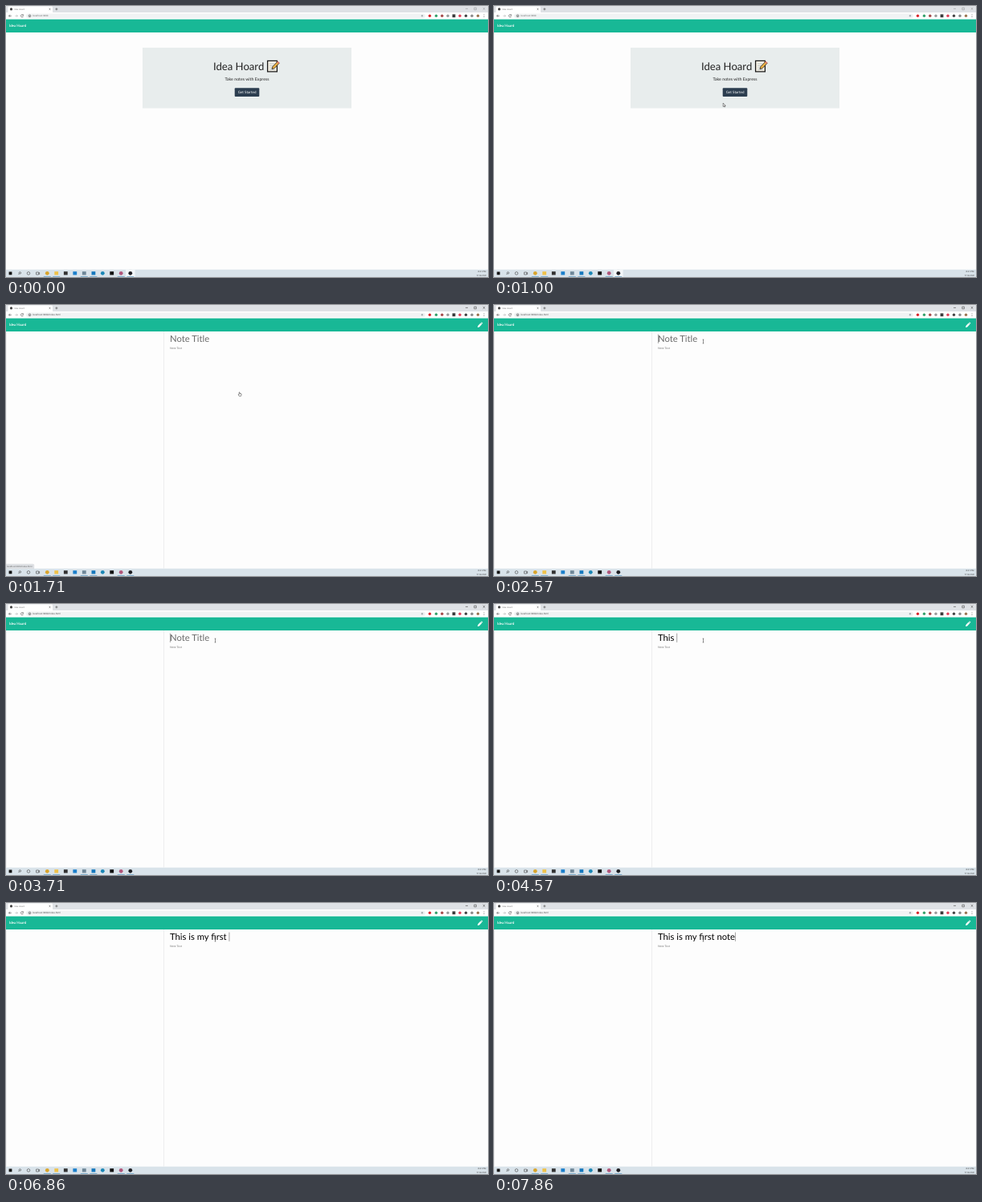
Write an HTML page that moves like this. It is 600x338 px and loops after 8000 ms.

```html
<!DOCTYPE html>
<html lang="en">
<head>
<meta charset="utf-8">
<title>Idea Hoard</title>
<style>
  html, body { margin: 0; width: 100%; height: 100%; overflow: hidden; background: #fdfdfd; }
  svg { display: block; width: 100%; height: 100%; }
  text { font-family: Lato, sans-serif; white-space: pre; text-rendering: geometricPrecision; }
  .ui { font-family: "Open Sans", sans-serif; }
  .line { fill: none; stroke: #444; stroke-width: .6; }
</style>
</head>
<body>
<svg viewBox="0 0 600 338">
  <rect width="600" height="338" fill="#fdfdfd"/>

  <g id="home">
    <rect x="170" y="52" width="260" height="75.5" fill="#e8eded"/>
    <text x="258" y="79.6" font-size="13.125" fill="#222">Idea Hoard</text>
    <g id="memo">
      <path d="M325.6 68.4H337.4V81.9H325.6Z" fill="#f6f1e4" stroke="#1a1a1a" stroke-width="1.3"/>
      <path d="M328 72H334M328 74.6H333M328 77.2H331M328 79.6H335" stroke="#a9b9c4" stroke-width=".7"/>
      <path d="M331 78.6L331.8 75.8L338 69.2L340.2 71.2L334 77.8Z" fill="#f2b544" stroke="#1a1a1a" stroke-width=".8"/>
      <path d="M337 70.2L338.4 68.8L340.6 70.8L339.2 72.2Z" fill="#d97a6c"/>
    </g>
    <text x="300" y="93.3" font-size="5.25" fill="#222" text-anchor="middle">Take notes with Express</text>
    <rect id="button" x="284.7" y="102.2" width="30.6" height="10.7" rx="1"/>
    <text x="300.1" y="109.1" font-size="4.5" fill="#fff" text-anchor="middle">Get Started</text>
  </g>

  <g id="notes">
    <path d="M.3 33V328.5M196.5 33V328.5" stroke="#e3e5e6" stroke-width=".6"/>
    <text id="title" x="204" y="46.1" font-size="11.25"></text>
    <text x="204" y="55.3" font-size="3.516" fill="#777">Note Text</text>
    <path id="caret" d="M0 36.6V47.8" stroke="#444" stroke-width=".5"/>
  </g>

  <g id="browser">
    <rect width="600" height="8.2" fill="#dee1e5"/>
    <path d="M1.5 8.2Q2.5 8.2 2.5 7V2Q2.5 .6 4 .6H56.5Q58 .6 58 2V7Q58 8.2 59 8.2Z" fill="#fff"/>
    <circle id="favicon" cx="6.5" cy="3.9" r="1.6" fill="#444"/>
    <text class="ui" x="10.2" y="4.9" font-size="2.5" fill="#666">Idea Hoard</text>
    <path class="line" d="M53.7 3.1L55.3 4.7M55.3 3.1L53.7 4.7M61.4 3.9H64.4M62.9 2.4V5.4"/>
    <path id="windowButtons" class="line" d="M572 3.4H575M582.8 2.2H585.4V4.8H582.8ZM593.7 2.1L596.3 4.7M596.3 2.1L593.7 4.7"/>
    <rect y="8.2" width="600" height="8.4" fill="#fff"/>
    <rect x="25" y="9.4" width="497" height="5.9" rx="2.95" fill="#f1f3f4"/>
    <path class="line" d="M6.8 12.3H3.6M5 10.8L3.5 12.3L5 13.8"/>
    <path class="line" opacity=".4" d="M11.2 12.3H14.4M13 10.8L14.5 12.3L13 13.8"/>
    <path id="reload" class="line"/>
    <circle class="line" cx="29.5" cy="12.3" r="1.4"/>
    <path class="line" d="M29.5 12V13.1"/>
    <text id="address" class="ui" x="33" y="13.3" font-size="2.9"></text>
    <path class="line" d="M595 10.4V11M595 12V12.6M595 13.6V14.2" style="stroke-width:.8"/>
    <rect y="16.6" width="600" height="16.4" fill="#18b896"/>
    <text x="4" y="26.4" font-size="4.4" fill="#fff" stroke="#fff" stroke-width=".08">Idea Hoard</text>
    <path id="pencil" d="M587 28L587.6 25.7L590.8 22.5L592.4 24.1L589.2 27.4ZM591.2 22.1L591.7 21.6Q592.1 21.4 592.4 21.7L593.2 22.5Q593.5 22.8 593.2 23.2L592.8 23.7Z" fill="#fff"/>
  </g>

  <g id="taskbar">
    <rect y="328.7" width="600" height="9.3" fill="#d9e3ea"/>
    <rect id="activeApp" x="149" y="328.7" width="11.6" height="9.3" fill="#f2f6f8"/>
    <circle class="line" cx="17.4" cy="332.9" r="1.2"/>
    <path class="line" d="M16.5 333.8L15.4 335M37.6 332H40.6V335H37.6ZM41.6 332V335"/>
    <circle class="line" cx="28" cy="333.4" r="1.8"/>
    <g class="ui" font-size="2.7" fill="#333" text-anchor="end">
      <text class="ui" x="597.5" y="332.4">8:21 PM</text>
      <text class="ui" x="598.5" y="336.6">7/12/2021</text>
    </g>
  </g>

  <g id="status">
    <path d="M0 323.2H33.5Q34.8 323.2 34.8 324.5V328.7H0Z" fill="#dee1e5" stroke="#c5c8cb" stroke-width=".3"/>
    <text class="ui" x="1" y="327" font-size="2.6" fill="#555">localhost:3000/index.html</text>
  </g>

  <g id="pointer" stroke="#222" stroke-width=".5" stroke-linejoin="round">
    <path id="arrow" d="M0 0V4.4L1 3.5L1.7 5L2.4 4.7L1.8 3.3H3.1Z" fill="#fff"/>
    <path id="hand" d="M-.8 .3V-2Q-.4 -2.7 0 -2V-.6L2 -.1V1.3L1.4 2.7H-.7L-1.9 .8Q-1.7 .1 -.8 .7Z" fill="#fff"/>
    <path id="beam" d="M-.8 -2.4H.8M0 -2.4V2.4M-.8 2.4H.8" fill="none"/>
  </g>
</svg>
<script>
const LOOP = 8000, STEPS_PER_MS = .007;
const $ = id => document.getElementById(id);
const show = (id, on) => $(id).style.display = on ? "" : "none";
const set = (id, attrs) => { for (const k in attrs) $(id).setAttribute(k, attrs[k]); };

function add(parent, tag, attrs) {
  const el = document.createElementNS("http://www.w3.org/2000/svg", tag);
  for (const k in attrs) el.setAttribute(k, attrs[k]);
  $(parent).append(el);
}
const dot = (parent, cx, cy, r, fill) => add(parent, "circle", { cx, cy, r, fill });
const box = (parent, x, y, w, h, fill) =>
  add(parent, "rect", { x: x - w / 2, y: y - h / 2, width: w, height: h, fill });

// Toolbar extensions
[[518, "#aab0b4"], [527.5, "#d8262c"], [535.5, "#35a06b"], [542.8, "#a34b4b"], [550, "#999"],
 [565, "#dc4057"], [572.5, "#444"], [580, "#888"], [587.5, "#9a7350"]]
  .forEach(([x, fill]) => dot("browser", x, 12.3, x < 520 ? 1.2 : 1.7, fill));
box("browser", 557.5, 12.3, 3.8, 3.8, "#3b3b3b");

// Taskbar apps: x, colour, round, running
box("taskbar", 5.5, 333.4, 3.8, 3.8, "#111");
[[51.3, "#d9a52c", 1, 1], [62.7, "#efc24a", 0, 1], [74.3, "#333", 0, 0], [85.8, "#1b7fcb", 0, 0],
 [97.3, "#6f8798", 0, 1], [108.9, "#1678bd", 0, 1], [120.3, "#1b86b5", 1, 0], [131.7, "#111", 0, 0],
 [143.2, "#b0567a", 1, 1], [154.8, "#1d1d22", 1, 1]].forEach(([x, fill, round, running]) => {
  if (round) dot("taskbar", x, 333.3, 2.4, fill);
  else box("taskbar", x, 333.3, 4.8, 4.3, fill);
  if (running) box("taskbar", x, 337.6, 9, .7, "#5f9cc4");
});

const TEXT = "This is my first note";
// Step at which each character is typed
const KEYS = [28, 29, 30, 31, 32, 34, 35, 36, 38, 39, 40, 42, 43, 44, 45, 46, 47, 53, 54, 55, 55];
const within = (n, from, to) => n >= from && n < to;

function glide(n, from, to, [x0, y0], [x1, y1]) {
  const p = Math.min(1, Math.max(0, (n - from) / (to - from)));
  const e = p * p * (3 - 2 * p);
  return [x0 + (x1 - x0) * e, y0 + (y1 - y0) * e];
}

function draw(time) {
  const n = Math.floor(time * STEPS_PER_MS + .04);
  const onNotes = n >= 12, hovering = n >= 8, focused = n >= 10, loading = within(n, 10, 12);

  show("home", !onNotes);
  show("notes", onNotes);
  show("pencil", onNotes);
  show("favicon", !loading);
  show("activeApp", !focused);
  show("status", within(n, 8, 15));
  set("windowButtons", { opacity: focused ? 1 : .45 });
  set("button", {
    fill: focused ? "#17212a" : hovering ? "#1e2b37" : "#2c3e50",
    stroke: focused ? "#6c7b88" : "none", "stroke-width": .8
  });
  set("reload", { d: loading ? "M18.9 11.2L21.1 13.4M21.1 11.2L18.9 13.4"
    : "M21.3 11.4A1.6 1.6 0 1 0 21.5 12.9M21.6 10.5V11.8H20.3" });
  $("address").textContent = "localhost:3000" + (onNotes ? "/index.html" : "");
  set("address", { fill: focused ? "#444" : "#666" });

  const typed = TEXT.slice(0, KEYS.filter(k => k <= n).length);
  const title = $("title");
  title.textContent = typed;
  const caretX = 204.4 + (typed && onNotes ? title.getComputedTextLength() : 0);
  if (!typed) title.textContent = "Note Title";
  set("title", { fill: typed ? "#000" : "#6b6b6b" });
  set("caret", { transform: `translate(${caretX})` });
  show("caret", n >= 17 && !within(n, 20, 23) && !within(n, 50, 53));

  const [x, y] = n < 13 ? glide(n, 0, 8, [156, 345], [291, 111])
                        : glide(n, 13, 16, [291, 111], [260.5, 45.5]);
  set("pointer", { transform: `translate(${x} ${y})` });
  show("arrow", !hovering);
  show("hand", within(n, 8, 14));
  show("beam", n >= 14);
}

function tick() {
  draw(performance.now() % LOOP);
  requestAnimationFrame(tick);
}
tick();
</script>
</body>
</html>
```
